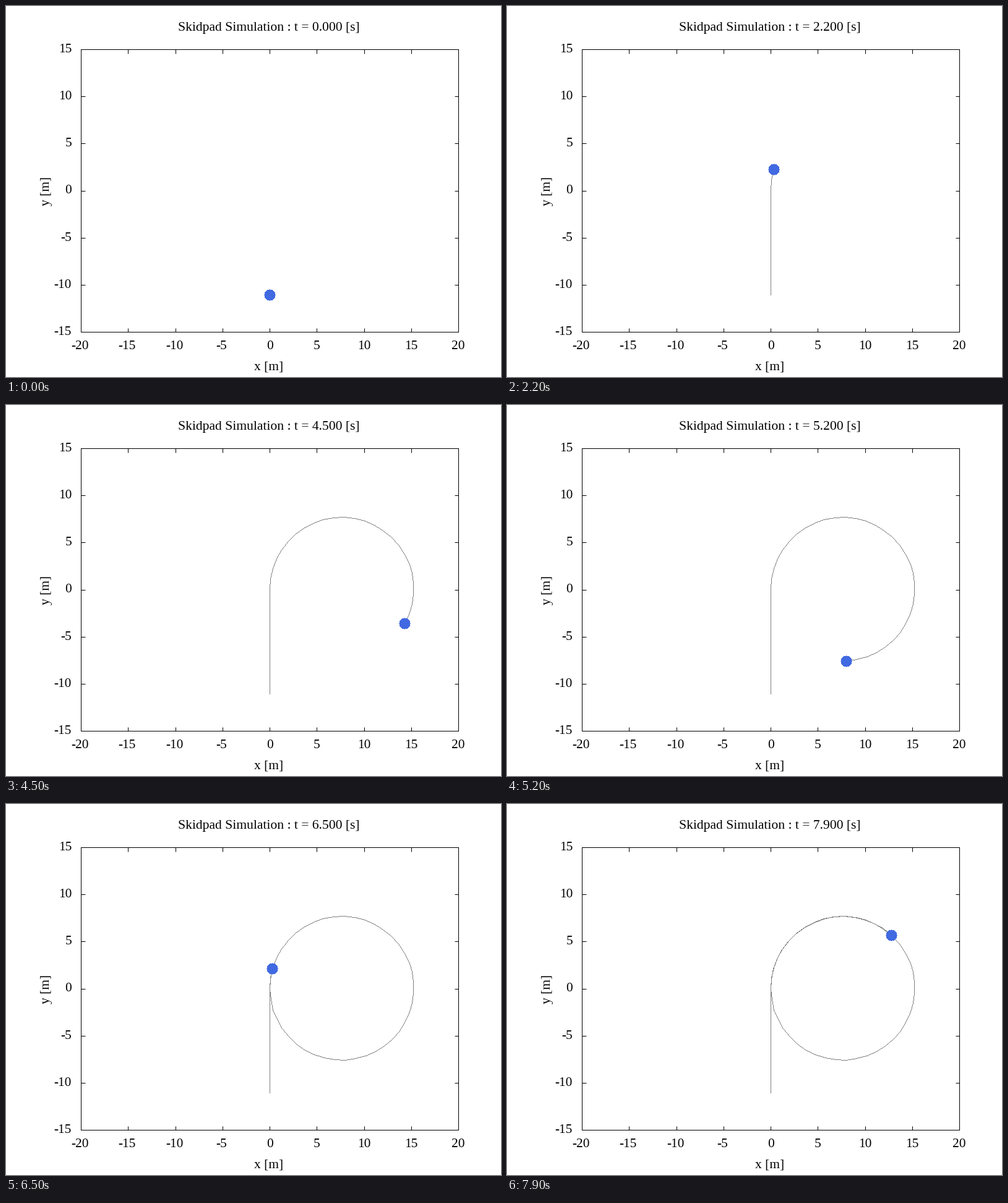
Write a matplotlib script that moves like this. It is 800 px wide and 600 px high and loops after 8 s.

```python
import numpy as np
import matplotlib.pyplot as plt
from matplotlib.animation import FuncAnimation
from matplotlib.collections import PolyCollection
from matplotlib.patches import Circle
from matplotlib.transforms import IdentityTransform

W, H, DPI = 800, 600, 100
PX = 72 / DPI                      # one pixel in points
LEFT, BOTTOM, WIDTH, HEIGHT = 121, 73, 610, 457   # plot area, y upwards
FRAMES, STEP_MS = 80, 100

SPEED = 40 / 3.6                   # cruising speed, m/s
RADIUS = 15.25 / 2                 # skidpad circle, m
T_TURN = 2.0                       # end of the straight run-up, s
UNIT = np.array([(0, 0), (1, 0), (1, 1), (0, 1)])

plt.rcParams["font.family"] = "Liberation Serif"
plt.rcParams["font.size"] = 21.4 * PX


def position(t):
    """Uniform acceleration up to the origin, then a clockwise circle."""
    run = SPEED * (t**2 / (2 * T_TURN) - T_TURN / 2)
    angle = SPEED / RADIUS * (t - T_TURN)
    straight = t < T_TURN
    x = np.where(straight, 0, RADIUS * (1 - np.cos(angle)))
    y = np.where(straight, run, RADIUS * np.sin(angle))
    return x, y


def snap(v):
    return np.floor(np.asarray(v) + 0.5).astype(int)


def to_pixel(x, y):
    return np.stack([snap(LEFT + (x + 20) / 40 * WIDTH),
                     snap(BOTTOM + (y + 15) / 30 * HEIGHT)], axis=-1)


def segment(a, b):
    """Pixels of a one-pixel line without antialiasing."""
    n = max(abs(b - a).max(), 1)
    return snap(a + np.linspace(0, 1, n + 1)[:, None] * (b - a))


fig = plt.figure(figsize=(W / DPI, H / DPI), dpi=DPI, facecolor="white")
ax = fig.add_axes([LEFT / W, BOTTOM / H, WIDTH / W, HEIGHT / H])
ax.set(xlim=(-20, 20), ylim=(-15, 15),
       xticks=range(-20, 21, 5), yticks=range(-15, 16, 5))
ax.tick_params(direction="in", length=6.5 * PX, width=PX, top=True, right=True,
               labelbottom=False, labelleft=False)
for spine in ax.spines.values():
    spine.set_linewidth(PX)


def label(x, y, text, ha="center", **kw):
    return fig.text(x / W, 1 - y / H, text, ha=ha, va="baseline", **kw)


for v in range(-20, 21, 5):
    x, _ = to_pixel(v, 0)
    label(x - (2 if v < 0 else 0), 555, str(v))
for v in range(-15, 16, 5):
    _, y = to_pixel(0, v)
    label(106, H - 1 - y + 6, str(v), ha="right")

label(424.5, 589, "x [m]")
label(70, 299, "y [m]", rotation=90, rotation_mode="anchor")
title = label(425, 40, "", fontsize=21.7 * PX)

path = to_pixel(*position(np.arange(FRAMES) * STEP_MS / 1000))
pieces = [segment(path[max(i - 1, 0)], path[i]) for i in range(FRAMES)]

trail = PolyCollection([], facecolors="#7f7f7f", linewidths=0,
                       antialiaseds=False, transform=IdentityTransform())
car = Circle((0, 0), 8.53, facecolor="royalblue", linewidth=0,
             antialiased=False, transform=IdentityTransform(), zorder=3)
ax.add_collection(trail, autolim=False)
ax.add_artist(car)


def update(i):
    pixels = np.unique(np.concatenate(pieces[:i + 1]), axis=0)
    trail.set_verts(pixels[:, None, :] + UNIT)
    car.center = path[i] + 0.5
    title.set_text(f"Skidpad Simulation : t = {i * STEP_MS / 1000:.3f} [s]")
    return trail, car, title


anim = FuncAnimation(fig, update, frames=FRAMES, interval=STEP_MS,
                     repeat=True, repeat_delay=0)
plt.show()
```
